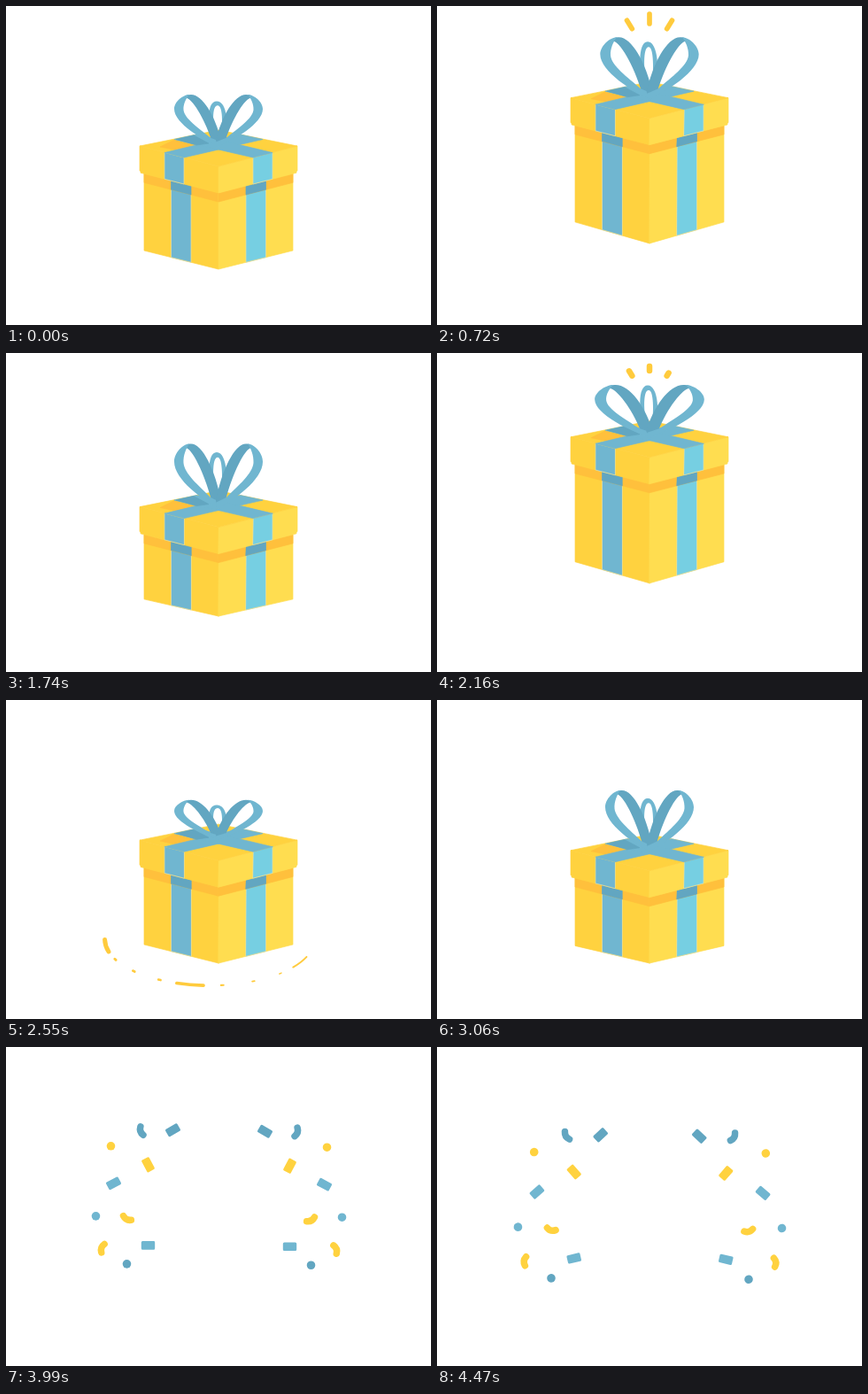
These frames come from a looping animation (480 by 360 pixels, 4.5 s). An HTML page with a canvas:

```html
<!DOCTYPE html>
<html lang="en">
<head>
<meta charset="utf-8">
<title>Jumping gift</title>
<style>
  html, body { margin: 0; width: 100%; height: 100%; overflow: hidden; background: #fff; }
  canvas { display: block; }
</style>
</head>
<body>
<canvas id="stage" width="480" height="360"></canvas>
<script>
const ctx = document.getElementById('stage').getContext('2d');
const LOOP = 4500, POP = 3780, JUMPS = [0, 1545, 2890];
const YELLOW = '#ffd23f', LIGHT = '#ffdd50', ORANGE = '#ffc03c', SPARK = '#ffcb3d';
const BLUE = '#70b6d0', SKY = '#76cfe2', SHADE = '#62a6c1', CREAM = '#e2e0a8';

// Left half of the confetti ring: offset from its centre, turn, shape, colour
const CONFETTI = [
  [-52, -86, -30, 'rect', SHADE], [-88, -85, 72, 'bean', SHADE],
  [-122, -68, 0, 'dot', YELLOW], [-80, -47, 62, 'rect', YELLOW],
  [-119, -26, -28, 'rect', BLUE], [-139, 11, 0, 'dot', BLUE],
  [-104, 14, 28, 'bean', YELLOW], [-132, 47, 110, 'bean', YELLOW],
  [-80, 44, 0, 'rect', BLUE], [-104, 65, 0, 'dot', SHADE]
];

const clamp = v => Math.min(1, Math.max(0, v));
const mix = (a, b, p) => a + (b - a) * p;
const easeOut = p => 1 - (1 - p) ** 3;
const bump = (t, center, width) => Math.exp(-(((t - center) / width) ** 2));

// Crouch, leap with stretch, then land with the bow lagging behind
function poseAt(t) {
  const crouch = bump(t, 230, 90);
  return {
    base: 297 - 37.3 * Math.sin(Math.PI * clamp((t - 410) / 435)),
    height: 86 - 18 * crouch + 29 * bump(t, 665, 150) - 14 * bump(t, 890, 60),
    bowHeight: 52 + 15 * crouch + 14 * bump(t, 770, 90) - 13 * bump(t, 1000, 50) + 5 * bump(t, 1110, 60),
    bowHalf: 50 + 12 * bump(t, 600, 140)
  };
}

function poly(fill, stroke, ...points) {
  ctx.fillStyle = fill;
  ctx.strokeStyle = stroke;
  ctx.lineWidth = .7;
  ctx.beginPath();
  points.forEach(([x, y]) => ctx.lineTo(x, y));
  ctx.closePath();
  ctx.fill();
  ctx.stroke();
}

function strokePath(color, width) {
  ctx.strokeStyle = color;
  ctx.lineWidth = width;
  ctx.lineCap = 'round';
  ctx.stroke();
}

// Slanted wall between two distances from the front edge
function wall(side, fill, d0, d1, top, bottom, topSlope, bottomSlope = topSlope, edge = fill) {
  const point = (d, y, slope) => [240 + side * d, y - d * slope];
  poly(fill, edge, point(d0, top, topSlope), point(d1, top, topSlope),
    point(d1, bottom, bottomSlope), point(d0, bottom, bottomSlope));
}

function drawBox(base, height) {
  const lid = base - height, lidK = 23 / 89, bodyK = (21 + (height - 86) * .12) / 84;
  for (const side of [-1, 1]) {
    const yellow = side < 0 ? YELLOW : LIGHT, blue = side < 0 ? BLUE : SKY;
    wall(side, yellow, 0, 84, lid, base, lidK, bodyK);
    wall(side, blue, 31, 53.5, lid, base, lidK, bodyK, CREAM);
    wall(side, ORANGE, 0, 84, lid, lid + 10, lidK);
    wall(side, SHADE, 31, 53.5, lid, lid + 10, lidK);
    wall(side, yellow, 0, 88, lid - 30, lid, lidK);
    wall(side, yellow, 86, 89, lid - 30, lid - 2, lidK);
    wall(side, blue, 39, 61, lid - 30, lid, lidK, lidK, CREAM);
  }
  const edge = lid - 53, y = v => edge + v;
  poly(YELLOW, YELLOW, [151, edge], [240, y(-18)], [329, edge], [240, y(23)]);
  poly(ORANGE, ORANGE, [174, y(1)], [190, y(-7)], [215, y(0)], [194, y(5)]);
  for (const side of [-1, 1]) {
    const x = d => 240 + side * d;
    poly(BLUE, BLUE, [x(61), y(7.5)], [x(-25), y(-13)], [x(-50), y(-7.5)], [x(39), y(13)]);
  }
  poly(SHADE, SHADE, [192, y(-7.5)], [212, y(-12)], [229, y(-3)], [215, y(-1)]);
}

// Bow paths use unit space: x is half widths, y is heights above the knot
function drawBow(knot, height, half) {
  const shape = (color, xScale, yScale, path) => {
    ctx.save();
    ctx.translate(240, knot);
    ctx.scale(xScale, -yScale);
    ctx.fillStyle = color;
    ctx.fill(new Path2D(path));
    ctx.restore();
  };
  const middle = height * (.86 + (half - 50) * .011);
  shape(BLUE, 50, middle, 'M-.1 .05C-.24 .4-.28 1-.04 1C.2 1 .24 .4 .12 .05L.05 .12' +
    'C.1 .45 .1 .9-.02 .9C-.15 .9-.14 .45-.05 .12Z');
  for (const side of [1, -1]) {
    shape(SHADE, side * half, height, 'M-.74 .93C-.6 .93-.32 .5-.17 .08L0-.06L.06 .04' +
      'C-.07 .55-.36 1-.62 1C-.7 1-.74 .97-.74 .93Z');
    shape(BLUE, side * half, height, 'M.04-.1C-.35 .05-1 .4-1 .7C-1 .85-.8 1-.66 1' +
      'C-.73 .93-.8 .8-.79 .68C-.77 .5-.45 .3-.18 .1L.04 .02Z');
  }
}

function drawSparks(p) {
  for (const i of [0, 1, 2]) {
    if (p <= i * .06 || p >= 1) continue;
    const angle = (i - 1) * .56, tail = clamp((p - .65) / .35);
    const head = Math.max(tail, clamp((p - i * .06) / .5));
    ctx.beginPath();
    for (const part of [tail, head]) {
      const radius = mix(37, 48, part);
      ctx.lineTo(240 + radius * Math.sin(angle), 57 - radius * Math.cos(angle));
    }
    strokePath(SPARK, 6.5 * Math.min(1, 2.4 * (1 - p)));
  }
}

// Strokes and drops along the front of a widening ellipse, fading left to right
function drawSplash(p) {
  if (p <= 0) return;
  const spread = .93 + .12 * p;
  for (let i = 0; i < 9; i++) {
    const long = i % 4 === 0, left = clamp(1.6 * (1 - p / (1 - i * .035)));
    const width = (long ? 8 : 5) * left;
    if (width < 1) continue;
    const angle = 3 - i * .31, span = long ? .13 : .012;
    ctx.beginPath();
    ctx.ellipse(230, 270, 118 * spread, 52 * spread, 0, angle - span, angle + span);
    strokePath(SPARK, width);
  }
}

function drawConfetti(time) {
  const burst = easeOut(clamp((time - 3660) / 165)), drift = (time - 3990) / 480;
  if (burst <= 0) return;
  for (const [dx, dy, turn, kind, color] of CONFETTI) {
    for (const side of [1, -1]) {
      const x = dx * (1 + .072 * drift), y = dy * (1 + .07 * drift) + 11.5 * drift;
      ctx.save();
      ctx.translate(240.5 + side * x * burst, 180.5 - side * .7 + y * burst);
      ctx.scale(side, 1);
      ctx.rotate((turn - 13 * drift) * Math.PI / 180);
      ctx.fillStyle = color;
      ctx.beginPath();
      if (kind === 'dot') ctx.arc(0, 0, 4.8, 0, 7);
      if (kind === 'rect') ctx.roundRect(-7.7, -4.8, 15.4, 9.6, 1.5);
      if (kind === 'bean') {
        ctx.moveTo(-5, -1);
        ctx.quadraticCurveTo(0, 2.5, 5, -1);
        strokePath(color, 7.5);
      } else ctx.fill();
      ctx.restore();
    }
  }
}

function frame(now) {
  const time = now % LOOP;
  const local = time - JUMPS.filter(start => start <= time).pop();
  ctx.fillStyle = '#fff';
  ctx.fillRect(0, 0, 480, 360);
  drawConfetti(time);
  drawSplash((local - 850) / 255);
  if (time < POP) {
    const { base, height, bowHeight, bowHalf } = poseAt(local);
    drawBox(base, height);
    drawBow(base - height - 57, bowHeight + 2, bowHalf);
    drawSparks((local - 530) / 300);
  }
  requestAnimationFrame(frame);
}
requestAnimationFrame(frame);
</script>
</body>
</html>
```
